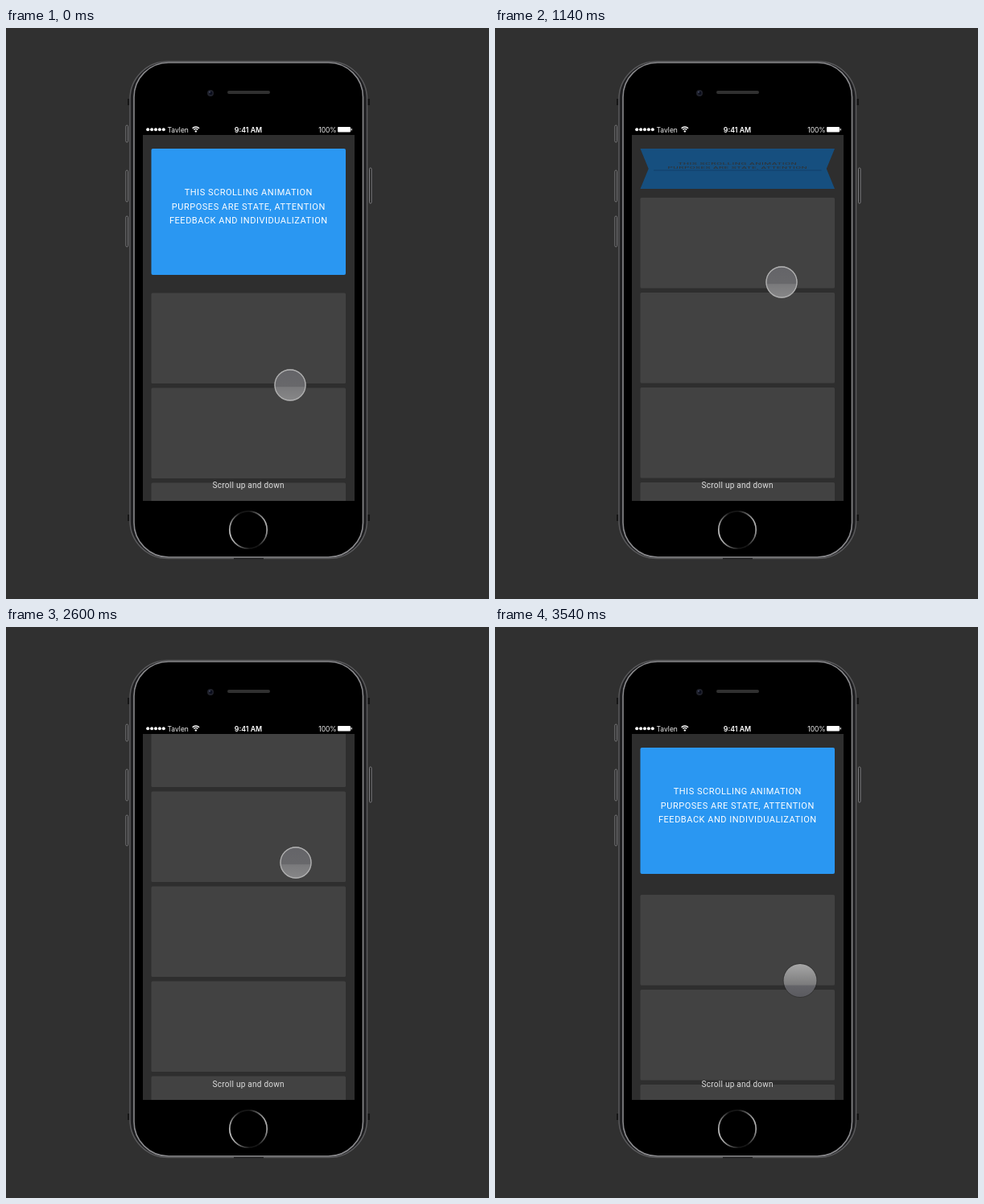
Recreate the animation shown at these times as an HTML page with a canvas. Size 600 by 710 pixels, loop 3.56 s.

```html
<!DOCTYPE html>
<html lang="en">
<head>
<meta charset="utf-8">
<title>Scrolling animation</title>
<style>
  html, body { margin: 0; width: 600px; height: 710px; overflow: hidden; background: #303030; }
  canvas { display: block; }
</style>
</head>
<body>
<canvas id="stage" width="600" height="710"></canvas>
<script>
const ctx = document.getElementById('stage').getContext('2d');
const LOOP = 3560;
const CARD = { x: 180.5, y: 150, w: 241.5, h: 157 };
const REST = 329.5;

// Key points as [time, value], joined by a smooth curve without overshoot.
const listKeys = [[140, REST], [760, 283], [1140, 211], [1225, 188], [1620, 105.5],
  [2100, 86], [2560, 86], [2600, 86.5], [2960, 229], [3060, 270], [3260, 334], [3360, 339], [3540, 333]];
const touchYKeys = [[140, 444], [760, 395], [1140, 316], [1225, 292], [2560, 292], [2600, 293], [2960, 439.5]];
const touchXKeys = [[760, 353], [1140, 356], [2400, 356], [2600, 360], [2960, 379]];
const pressKeys = [[1220, 1], [1300, 0], [2480, 0], [2560, 1], [2950, 1], [3030, 0]];

const clamp = (v, lo, hi) => Math.min(hi, Math.max(lo, v));

function slopeAt(keys, i) {
  if (i === 0 || i === keys.length - 1) return 0;
  const slope = j => (keys[j + 1][1] - keys[j][1]) / (keys[j + 1][0] - keys[j][0]);
  const a = slope(i - 1), b = slope(i);
  return a * b <= 0 ? 0 : 2 * a * b / (a + b);
}

function valueAt(keys, t) {
  const last = keys.length - 1;
  if (t <= keys[0][0]) return keys[0][1];
  if (t >= keys[last][0]) return keys[last][1];
  const i = keys.findIndex(k => k[0] > t) - 1;
  const [t0, v0] = keys[i], [t1, v1] = keys[i + 1];
  const d = t1 - t0, u = (t - t0) / d, w = 1 - u;
  return v0 * (1 + 2 * u) * w * w + v1 * (3 - 2 * u) * u * u
    + d * u * w * (slopeAt(keys, i) * w - slopeAt(keys, i + 1) * u);
}

function roundRect(x, y, w, h, r, fill, stroke, width = 1) {
  ctx.beginPath();
  ctx.roundRect(x, y, w, h, r);
  if (fill) { ctx.fillStyle = fill; ctx.fill(); }
  if (stroke) { ctx.strokeStyle = stroke; ctx.lineWidth = width; ctx.stroke(); }
}

function disc(x, y, r, fill) {
  ctx.beginPath();
  ctx.arc(x, y, r, 0, Math.PI * 2);
  ctx.fillStyle = fill;
  ctx.fill();
}

function polygon(points, fill) {
  ctx.beginPath();
  points.forEach(([x, y]) => ctx.lineTo(x, y));
  ctx.closePath();
  ctx.fillStyle = fill;
  ctx.fill();
}

function gradient(x0, y0, x1, y1, stops) {
  const g = ctx.createLinearGradient(x0, y0, x1, y1);
  stops.forEach(([at, color]) => g.addColorStop(at, color));
  return g;
}

function label(text, x, y, font, color, spacing = 0, align = 'left') {
  ctx.font = font;
  ctx.letterSpacing = spacing + 'px';
  ctx.textAlign = align;
  ctx.fillStyle = color;
  ctx.fillText(text, x, y);
}

function drawPhone() {
  for (const [y, h] of [[121, 21], [177, 39], [234, 38]]) roundRect(149, y, 2.5, h, 1.2, '#1c1c1c', '#808083');
  roundRect(451.5, 174, 2.5, 44, 1.2, '#1c1c1c', '#808083');
  for (const x of [151, 449]) for (const y of [88, 605]) roundRect(x, y, 3, 8, 0, '#161616');

  // Metal rim: a soft outer edge and a brighter inner one.
  roundRect(154, 41.5, 294.5, 618, 47, '#1e1e20', '#58585a', 1.6);
  roundRect(159, 43, 284.5, 615, 43, '#000', '#8a8a8d', 1.6);
  roundRect(283, 659, 37, 1.5, 0, '#1d1d1e');

  disc(254, 81, 4, '#20222c');
  disc(254.5, 81, 2, '#0a0d1c');
  disc(253, 79.7, 0.9, '#4a506b');
  roundRect(275, 78, 53, 4, 2, '#303030');

  ctx.beginPath();
  ctx.arc(301, 624, 23.2, 0, Math.PI * 2);
  ctx.lineWidth = 1.7;
  ctx.strokeStyle = gradient(278, 630, 324, 618,
    [[0, '#c4c4c4'], [0.2, '#606060'], [0.4, '#161616'], [0.65, '#161616'], [0.85, '#606060'], [1, '#b4b4b4']]);
  ctx.stroke();
}

function drawStatus() {
  const font = 'Inter, Roboto, sans-serif';
  for (let i = 0; i < 5; i++) disc(176.2 + i * 4.9, 126.2, 2, '#fff');
  label('Tavlen', 200.5, 129.6, '8.5px ' + font, '#f0f0f0');
  label('9:41 AM', 301, 129.6, '600 8.8px ' + font, '#fff', 0, 'center');
  label('100%', 410.7, 129.6, '8.5px ' + font, '#f0f0f0', 0, 'right');

  ctx.strokeStyle = '#fff';
  ctx.lineWidth = 1.3;
  for (const r of [3.6, 6]) {
    ctx.beginPath();
    ctx.arc(235.8, 129, r, -Math.PI * 0.75, -Math.PI * 0.25);
    ctx.stroke();
  }
  disc(235.8, 128.4, 1.2, '#fff');
  roundRect(412, 123, 16, 6.5, 1, '#fff');
  roundRect(428.6, 125, 1.2, 2.5, 0.5, '#fff');
}

function drawBanner(listTop) {
  const height = clamp(CARD.h - 0.903 * (REST - listTop), 0, CARD.h);
  if (height < 1) return;
  const fold = 1 - height / CARD.h;
  const angle = Math.min(1.8 * fold, Math.PI / 2);
  const { x, y, w } = CARD;
  const middle = y + height / 2;
  const blue = `rgb(${[42, 151, 242].map(c => c * (1 - 0.7 * fold)).join()})`;

  if (fold < 0.005) {
    roundRect(x, y, w, height, 2, blue);
  } else {
    const inset = w / 2 * 0.09 * Math.sin(angle);
    polygon([[x, y], [x + w, y], [x + w - inset, middle], [x + w, y + height],
      [x, y + height], [x + inset, middle]], blue);
  }

  // The lettering tilts back from the top edge.
  const scaleY = Math.cos(angle);
  if (scaleY < 0.03) return;
  const shrink = 0.1 * Math.sin(angle);
  const light = 255 * clamp(1 - 0.6 * fold - 0.85 * fold * fold, 0.1, 1);
  const lines = ['THIS SCROLLING ANIMATION', 'PURPOSES ARE STATE, ATTENTION', 'FEEDBACK AND INDIVIDUALIZATION'];
  lines.slice(0, fold < 0.02 ? 3 : 2).forEach((line, i) => {
    const offset = 58 + i * 17.5;
    ctx.save();
    ctx.translate(301.3, y + offset * scaleY);
    ctx.scale(1 - shrink * offset / 78.5, scaleY);
    label(line, 0, 0, '11px Roboto, sans-serif', `rgb(${light},${light},${light})`, 0.52, 'center');
    ctx.restore();
  });
  if (fold >= 0.02) {
    const half = 115 * (1 - shrink);
    ctx.fillStyle = 'rgba(10,40,75,.4)';
    ctx.fillRect(301.3 - half, y + 78.5 * scaleY, half * 2, 1);
  }
}

function drawScreen(listTop) {
  ctx.save();
  ctx.beginPath();
  ctx.rect(170, 133, 263, 455);
  ctx.clip();
  ctx.fillStyle = '#2e2e2e';
  ctx.fillRect(170, 133, 263, 455);
  drawBanner(listTop);
  for (let i = 0; i < 5; i++) roundRect(CARD.x, listTop + i * 118, CARD.w, 112.5, 1.5, '#424242');
  label('Scroll up and down', 301.2, 572, '10px Roboto, sans-serif', '#dedede', 0.26, 'center');
  ctx.restore();
}

function drawTouch(x, y, press) {
  const r = 20.5 - press;
  ctx.save();
  ctx.globalAlpha = 0.97;
  disc(x, y, r, gradient(0, y - r, 0, y + r, [[0, '#aaa'], [0.62, '#7e7e7f'], [0.67, '#65656a'], [1, '#5b5b60']]));
  ctx.globalAlpha = 1 - press;
  ctx.strokeStyle = 'rgba(30,30,30,.35)';
  ctx.lineWidth = 1;
  ctx.beginPath();
  ctx.arc(x, y, r + 0.5, 0, Math.PI * 2);
  ctx.stroke();
  ctx.globalAlpha = press;
  disc(x, y, r, gradient(0, y - r, 0, y + r, [[0, '#646468'], [0.54, '#68686b'], [0.57, '#7a7a7c'], [1, '#878788']]));
  ctx.beginPath();
  ctx.arc(x, y, r - 0.5, 0, Math.PI * 2);
  ctx.strokeStyle = '#b0b0b0';
  ctx.lineWidth = 1.3;
  ctx.stroke();
  ctx.restore();
}

function draw(t) {
  ctx.fillStyle = '#303030';
  ctx.fillRect(0, 0, 600, 710);
  drawPhone();
  drawStatus();
  drawScreen(valueAt(listKeys, t));
  drawTouch(valueAt(touchXKeys, t), valueAt(touchYKeys, t), valueAt(pressKeys, t));
}

let start;
function tick(now) {
  start ??= now;
  draw((now - start) % LOOP);
  requestAnimationFrame(tick);
}
draw(0);
requestAnimationFrame(tick);
</script>
</body>
</html>
```
